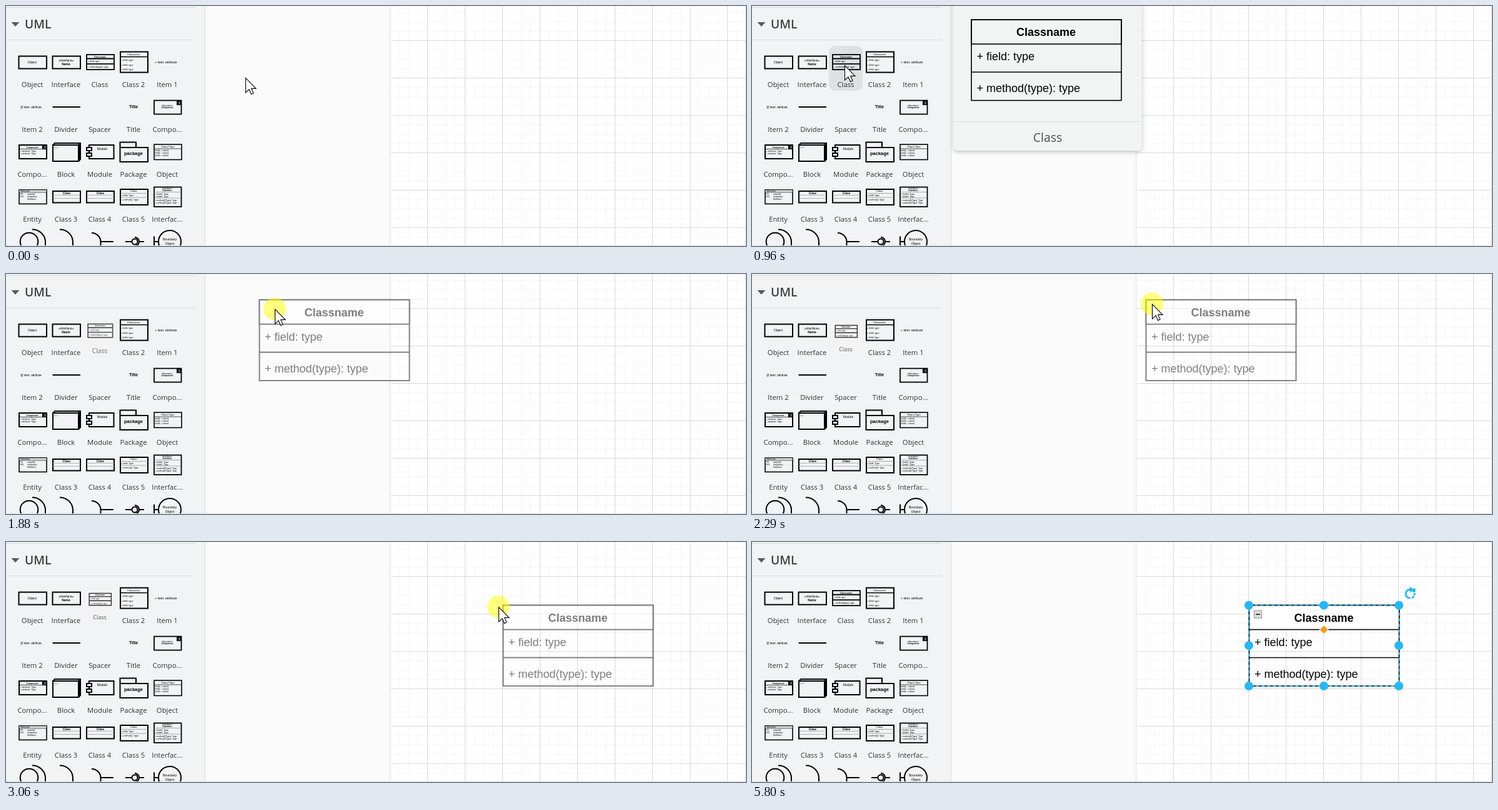
Animation, 1184 px wide and 385 px high, one loop 5930 ms. Source, as an HTML page:

```html
<!DOCTYPE html>
<html lang="en">
<head>
<meta charset="utf-8">
<title>Drag a class shape</title>
<style>
html, body { margin: 0; width: 100%; height: 100%; overflow: hidden; background: #fff; }
svg { display: block; width: 100vw; height: 100vh; }
text { font-family: "Liberation Sans", Arial, sans-serif; white-space: pre; }
.ui { font-family: "Open Sans", "Noto Sans", sans-serif; }
</style>
</head>
<body>
<svg id="stage" viewBox="0 0 1184 385"></svg>
<script>
const LOOP = 5930;
const BLUE = '#29b6f2';

// Markup helpers
const rect = (x, y, w, h, sw = 2, fill = 'none', stroke = '#000') =>
  `<rect x="${x}" y="${y}" width="${w}" height="${h}" fill="${fill}" stroke="${stroke}" stroke-width="${sw}"/>`;
const path = (d, sw = 2, stroke = '#000', fill = 'none') =>
  `<path d="${d}" fill="${fill}" stroke="${stroke}" stroke-width="${sw}"/>`;
const circle = (x, y, r, sw = 2, fill = 'none', stroke = '#000') =>
  `<circle cx="${x}" cy="${y}" r="${r}" fill="${fill}" stroke="${stroke}" stroke-width="${sw}"/>`;
const text = (x, y, s, size, attrs = '', fill = '#000') =>
  `<text x="${x}" y="${y}" font-size="${size}" fill="${fill}" ${attrs}>${s}</text>`;
const group = (id, body, attrs = '') => `<g id="${id}" ${attrs}>${body}</g>`;
const MID = 'text-anchor="middle"', BOLD = 'font-weight="700"', MB = MID + ' ' + BOLD;
const range = (a, b, step) => Array.from({ length: Math.ceil((b - a) / step) }, (_, i) => a + i * step);
const label = (col, row, s) => text(42 + col * 54, 130 + row * 72, s, 11.3, MID + ' class="ui"', '#333');

function canvas() {
  const v = (a, step) => range(a, 1184, step).map(x => `M${x} 0V384`).join('');
  const h = (a, step) => range(a, 384, step).map(y => `M616 ${y}H1183`).join('');
  return rect(318, 0, 297, 385, 0, '#fbfbfb') + rect(613, 0, 3, 385, 0, '#f0f0f0')
    + path(v(629.5, 15) + h(10.5, 15), 1, '#f5f5f5')
    + path(v(674.5, 60) + h(55.5, 60), 1, '#d9d9d9')
    + path('M1183.5 0V384', 1, '#d9d9d9');
}

function panel() {
  return rect(0, 0, 318, 385, 0, '#f1f3f5') + path('M318.5 0V384', 1, '#dadce0')
    + path('M0 2.5H303M0 54.5H303', 1, '#d8dadc')
    + path('M8.5 26H21.5L15 33Z', 0, 'none', '#5a5a5a')
    + text(30, 36, 'UML', 19.2, 'font-weight="600" class="ui"', '#424242');
}

const classThumb = rect(129, 78, 44, 24, 1.8) + path('M129 84.5H173M129 92.8H173', 1.8)
  + text(150.5, 82.6, 'Classname', 3.6, MB) + text(131, 89.6, '+ field: type', 3.6)
  + text(131, 99.4, '+ method(type): type', 3.6) + label(2, 0, 'Class');

function thumbs() {
  const names = [
    ['Object', 'Interface', '', 'Class 2', 'Item 1'],
    ['Item 2', 'Divider', 'Spacer', 'Title', 'Compo...'],
    ['Compo...', 'Block', 'Module', 'Package', 'Object'],
    ['Entity', 'Class 3', 'Class 4', 'Class 5', 'Interfac...']];
  const lines = (x, ys, s, size = 3.6) => ys.map(y => text(x, y, s, size)).join('');
  const badge = (x, y) => rect(x, y, 7, 7, 0, '#000') + path(`M${x + 3} ${y + 2}h2v3h-2`, .7, '#fff');
  const smallClass = x => rect(x, 297, 44, 18.5) + text(x + 22, 301.6, 'Class', 4.6, MB)
    + path(`M${x} 303.5h44M${x} 308.5h44`, .7, '#999');
  return names.map((r, j) => r.map((s, i) => label(i, j, s)).join('')).join('')
    // first row
    + rect(20.5, 80.5, 44.5, 20) + text(42, 92, 'Object', 5, MID)
    + rect(74.5, 80.5, 44.5, 20) + text(96, 88.5, '«interface»', 5, MID) + text(96, 94.6, 'Name', 5, MB)
    + rect(183, 73.5, 44, 33) + path('M183 81.5H227', 1.6) + text(204, 79, 'Classname', 4, MID)
    + lines(184, [88, 95.5, 103], '+ field: type', 3.8)
    + text(238, 91.5, '+ item: attribute', 5.1)
    // second row
    + text(23, 163.5, '@ item: attribute', 4.6) + path('M74.5 162H119', 2)
    + text(204, 164.2, 'Title', 6.8, MB)
    + rect(237, 151.5, 43.5, 22, 1.8) + badge(273, 152)
    + text(258, 160.5, '«Annotation»', 3, MID) + text(258, 164, 'Component', 3.4, MB)
    // third row
    + rect(21, 223, 44, 22) + badge(58, 223) + path('M21 229.5H65', .7) + text(42, 227.5, 'Component', 3.4, MB)
    + lines(22.5, [234, 238], '+ attribute: Type')
    + path('M75 223H116V249H75ZM75 223L78 220H119V246L116 249M116 223L119 220M117.5 222V247', 2)
    + text(77, 228, 'Block', 2.4)
    + rect(133, 223, 39.5, 22) + rect(129, 227, 8, 5, 2, '#f1f3f5') + rect(129, 236, 8, 5, 2, '#f1f3f5')
    + text(154, 230.5, 'Module', 5, MID)
    + path('M182.5 227V218.5H208V227M182.5 227H227V250H182.5Z', 2) + text(204, 239.3, 'package', 7.5, MB)
    + rect(237, 222, 44, 24.5, 1.6) + path('M237 229H281', .7) + text(259, 226.5, 'Object:Type', 4, MID)
    + lines(238.5, [233, 237, 241], 'field1 = value1', 3.4)
    // fourth row
    + rect(21, 295, 44, 22.5, 1.6) + rect(21, 295, 44, 4, .6, '#ddd') + text(22.5, 298.4, 'Tablename', 3.2)
    + text(22.5, 302.6, 'PK', 3.2) + text(34, 302.6, 'uniqueId', 3.2)
    + text(22.5, 307, 'FK1', 3.2) + text(34, 307, 'foreignKey', 3.2) + text(34, 311, 'fieldname', 3.2)
    + smallClass(75) + smallClass(129)
    + rect(183, 294, 44, 25) + path('M183 300.5H227M183 307H227', .7, '#888') + text(204, 298, 'Class', 4.4, MID)
    + text(184.5, 305, '+ field: Type', 3.6) + text(184.5, 312, '+ method(): Type', 3.6)
    + rect(237, 290.5, 43.5, 31.5, 1.8) + path('M237 298.5H280M237 308H280', .7, '#888')
    + text(258, 293.6, '«interface»', 3.4, MID) + text(258, 297, 'Interface', 3.6, MB)
    + lines(238.5, [302.5, 306.5], '+ field1: Type') + lines(238.5, [312.5, 316.5], '+ method1(Type): Type', 3.4)
    // fifth row, cut by the lower edge
    + circle(37, 378, 14.3) + path('M42 358.5A20.5 20.5 0 0 1 63 378V385', 2)
    + path('M86 358.5A20.5 20.5 0 0 1 107 378V385', 2)
    + path('M137 364A14.5 14.5 0 0 1 151.5 378V385M151.5 378H172', 2)
    + path('M191 378H201M213 378H221', 2) + circle(206, 378, 4.5) + path('M206 371A7 7 0 0 1 206 385', 2)
    + circle(262, 378, 18) + path('M237 369.5V385M237 378H244', 2)
    + text(262, 376.3, 'Boundary', 5.2, MID) + text(262, 382.6, 'Object', 5.2, MID);
}

const classShape = (sw, head = 'none') => rect(0, 0, 240, 129.5, sw)
  + rect(0, 0, 240, 39, sw, head) + path('M0 84H240', sw)
  + text(119.5, 26, 'Classname', 18, MB) + text(8.5, 65, '+ field: type', 18)
  + text(8.5, 116, '+ method(type): type', 18);

const tooltip = `<rect x="322.5" y="-20" width="301.5" height="252" rx="7" fill="#f1f4f3" filter="url(#soft)"/>`
  + path('M323 185.5H624', 1, '#dadddc')
  + text(473, 218, 'Class', 19.4, MID + ' class="ui"', '#505050')
  + group('tipShape', classShape(1.6), 'transform="translate(351 22)"');

function selection() {
  const dots = [0, 120, 240].flatMap(x => [0, 64.5, 129.5].map(y => [x, y]))
    .filter(([x, y]) => x !== 120 || y !== 64.5);
  return classShape(1.6, '#fff')
    + `<rect width="240" height="129.5" fill="none" stroke="${BLUE}" stroke-width="1.8" stroke-dasharray="4.5 4.5"/>`
    + dots.map(([x, y]) => circle(x - .5, y, 7, 0, BLUE)).join('')
    + path('M119.5 32L126.5 39L119.5 46L112.5 39Z', 1, '#fff', '#f39c1f')
    + rect(8, 8.5, 12, 12, 1, '#dedede', '#8c8c8c') + path('M10.5 14.5H17.5', 1.8, '#333')
    + path('M257 -11.5A7 7 0 0 1 256 -25.3L259 -25.4', 3, BLUE)
    + `<path d="M262 -24A7 7 0 0 1 258 -11.5" fill="none" stroke="${BLUE}" stroke-width="3" stroke-dasharray="3.6 1.6"/>`
    + path('M257 -30L263 -25L257 -20ZM261 -27H266V-21H261Z', 0, 'none', BLUE);
}

const arrows = [[915.5, 89, 0], [1048, 166, 90], [915.5, 243, 180], [782, 166, 270]].map(([x, y, a]) =>
  `<path transform="translate(${x} ${y}) rotate(${a})" d="M-4.5 0V-17H-12L0 -36L12 -17H4.5V0Z" fill="#dcf2fd"/>`).join('');

const pointer = path('M.5 .5V24L6 18.7L9.5 26.4L13 24.8L9.6 17.4H17Z', 1.1, '#000', '#fff');
const resizer = path('M-12 -12H-2.5L-5.5 -8.5L8.5 5.5L12 2.5V12H2.5L5.5 8.5L-8.5 -5.5L-12 -2.5Z', 1.1, '#000', '#fff');

const stage = document.getElementById('stage');
stage.innerHTML = `<defs><filter id="soft" x="-10%" y="-10%" width="120%" height="120%">
  <feDropShadow dx="0" dy="2" stdDeviation="3" flood-opacity=".25"/></filter></defs>`
  + canvas() + panel()
  + '<rect id="hover" y="64" width="54" height="72" rx="10" fill="#dfe0e1"/>'
  + thumbs()
  + group('classCell', '<rect id="cellBack" x="123" y="64" width="54" height="72" fill="#f3f4f2"/>' + classThumb)
  + path('M0 384.5H1184', 1, '#dcdcdc')
  + group('tip', tooltip)
  + group('ghost', classShape(1.9, '#fff'))
  + group('picked', selection(), 'transform="translate(795.5 101.5)"')
  + group('arrows', arrows)
  + '<circle id="halo" r="18" fill="#ff0" fill-opacity=".5"/>'
  + group('pointer', pointer) + group('resizer', resizer, 'transform="translate(788.5 104.5)"');

const el = id => document.getElementById(id);
const show = (id, on) => el(id).setAttribute('display', on ? 'inline' : 'none');
const move = (id, x, y) => el(id).setAttribute('transform', `translate(${x} ${y})`);

// Tracks: [time, value...]
const CURSOR = [[0, 383, 115], [70, 372, 115], [206, 285, 110], [342, 165, 106], [478, 108, 106], [614, 134, 103],
  [760, 148, 95], [1680, 148, 95], [1690, 248, 83], [1826, 430, 56], [1958, 553, 45], [2210, 553, 45],
  [2220, 596, 46], [2288, 640, 48], [2764, 763, 90], [2840, 763, 90], [3054, 788, 104], [5500, 788, 104],
  [5530, 782, 130], [5734, 734, 336]];
const GHOST = [[1690, 260, 26], [1958, 556, 41], [2210, 556, 41], [2220, 594, 41], [2288, 631, 41],
  [2764, 766, 86], [2840, 766, 86], [3054, 796, 101]];
const CELL = [[1690, 1, .55], [1958, .8, .8], [3780, .8, .8], [3922, 1, 1]];

function at(track, t) {
  const i = track.findIndex(k => k[0] > t);
  if (i < 0) return track[track.length - 1].slice(1);
  if (i === 0) return track[0].slice(1);
  const a = track[i - 1], b = track[i], p = (t - a[0]) / (b[0] - a[0]);
  return a.slice(1).map((v, j) => v + (b[j + 1] - v) * p);
}

function tick(t) {
  const start = [0, 70, 1690, 2220, 2850, 3790, 5530].filter(s => s <= t).pop();
  return start + Math.floor((t - start + 4) / 68) * 68;
}

const snap = (v, origin) => Math.round((v - origin) / 15) * 15 + origin;

function draw(ms) {
  const t = tick(ms);
  const [x, y] = at(CURSOR, t);
  const dragging = t >= 1690 && t < 3790;
  const dropped = t >= 3790;
  const outside = t < 1750;

  const col = t < 1690 ? Math.floor((x - 15) / 54) : 3;
  show('hover', outside && col < 5);
  el('hover').setAttribute('x', 15 + col * 54);

  const [scale, alpha] = t < 1690 ? [1, 1] : at(CELL, t);
  el('classCell').setAttribute('transform', `translate(150 100) scale(${scale}) translate(-150 -100)`);
  el('classCell').setAttribute('opacity', alpha);
  show('cellBack', dragging && !outside);

  show('tip', ms >= 960 && t < 1690);

  show('ghost', dragging);
  const [gx, gy] = at(GHOST, t);
  if (outside) move('ghost', x - 50, y + 11);
  else move('ghost', snap(gx, 1) - .5, snap(gy, 11) + .5);
  el('ghost').setAttribute('opacity', outside ? .7 : .5);

  show('halo', dragging);
  move('halo', x, y);

  show('picked', dropped);
  show('arrows', ms >= 4330 && t < 5530);
  show('resizer', dropped && t < 5530);
  show('pointer', t < 3790 || (t >= 5530 && t < 5800));
  move('pointer', x, y);
}

function loop(now) {
  draw(now % LOOP);
  requestAnimationFrame(loop);
}
draw(0);
requestAnimationFrame(loop);
</script>
</body>
</html>
```
